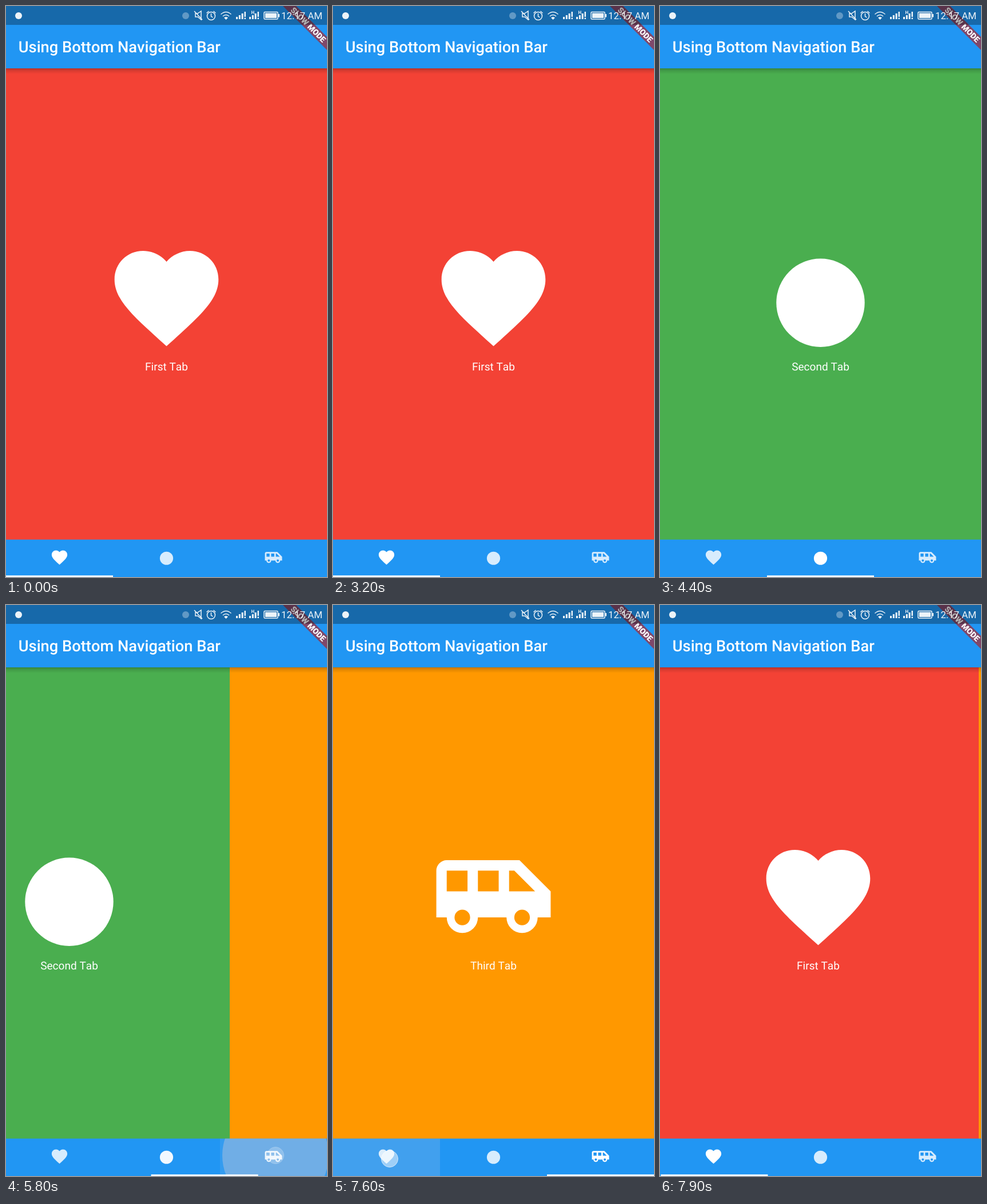
Write an HTML page that moves like this. It is 561x998 px and loops after 8 s.

```html
<!DOCTYPE html>
<html lang="en">
<head>
<meta charset="utf-8">
<title>Using Bottom Navigation Bar</title>
<style>
  html, body { margin: 0; width: 100%; height: 100%; overflow: hidden; background: #2196f3; }
  svg {
    display: block; width: 100%; height: 100%;
    font-family: Roboto, sans-serif; font-kerning: none; text-rendering: geometricPrecision;
  }
  .label { font-size: 19.07px; text-anchor: middle; fill: #fff; }
  .line { fill: none; stroke: #fff; stroke-width: 1.5; }
</style>
</head>
<body>
<svg viewBox="0 0 561 998">
  <defs>
    <path id="icon0" d="M12 21.35l-1.45-1.32C5.4 15.36 2 12.28 2 8.5 2 5.42 4.42 3 7.5 3c1.74 0 3.41.81 4.5 2.09C13.09 3.81 14.76 3 16.5 3 19.58 3 22 5.42 22 8.5c0 3.78-3.4 6.86-8.55 11.54z"/>
    <circle id="icon1" cx="12" cy="13" r="8.5"/>
    <path id="icon2" fill-rule="evenodd" d="M17 5H3a2 2 0 0 0-2 2v9h2a3 3 0 0 0 6 0h5.5a3 3 0 0 0 6 0H23v-5zM3 11V7h4v4zm1.5 5a1.5 1.5 0 0 1 3 0 1.5 1.5 0 0 1-3 0zM9 11V7h4v4zm7 5a1.5 1.5 0 0 1 3 0 1.5 1.5 0 0 1-3 0zM15 11V7h1l4 4z"/>
    <linearGradient id="shade" x2="0" y2="1">
      <stop stop-opacity=".24"/>
      <stop offset=".4" stop-opacity=".11"/>
      <stop offset="1" stop-opacity="0"/>
    </linearGradient>
    <clipPath id="cell"><rect id="cellBox" y="932.6" width="187" height="65.4"/></clipPath>
  </defs>

  <g id="pages"></g>

  <!-- App bar -->
  <rect y="109" width="561" height="10" fill="url(#shade)"/>
  <rect width="561" height="109" fill="#2196f3"/>
  <text x="21.8" y="80.5" font-size="27.25" font-weight="500" fill="#fff">Using Bottom Navigation Bar</text>
  <g transform="translate(561) rotate(45)">
    <rect x="-90" y="38.2" width="180" height="16.3" fill="#b71c1c" fill-opacity=".63"/>
    <text y="51.2" font-size="13.9" font-weight="900" text-anchor="middle" fill="#fff">SLOW MODE</text>
  </g>

  <!-- Status bar -->
  <rect width="561" height="33" fill-opacity=".3"/>
  <g fill="#fff" opacity=".92">
    <circle cx="22" cy="17" r="6"/>
    <circle cx="314" cy="17" r="6" opacity=".35"/>
    <path class="line" d="M331 13h4l6-4v15l-6-5h-4zM329 9l14 15"/>
    <path class="line" d="M351.5 17.5a7 7 0 1 0 14 0 7 7 0 1 0-14 0M358.5 13v5l3 2M350.5 12.5l4-3.5M366.5 12.5l-4-3.5"/>
    <path class="line" stroke-width="2" d="M375.5 14.5q9-8 18 0M379 18q5.5-5 11 0"/>
    <path d="M381 20.5q3.5-3 7 0L384.5 24z"/>
    <g id="signals"></g>
    <text x="428.5" y="14" font-size="8" font-weight="700">H</text>
    <rect class="line" x="451" y="10.5" width="24" height="12.5" rx="1.5"/>
    <path d="M453 12.5h20v8.5h-20zM476 14h2v5.5h-2z"/>
    <text x="481" y="23" font-size="16.9">12:17 AM</text>
  </g>

  <!-- Bottom tabs -->
  <rect y="932.6" width="561" height="65.4" fill="#2196f3"/>
  <g clip-path="url(#cell)" fill="#c8c8d8">
    <rect id="highlight" y="932.6" width="187" height="66"/>
    <circle id="splash"/>
  </g>
  <g id="tabs"></g>
  <rect id="indicator" y="995.3" width="187" height="2.7" fill="#fff"/>
  <circle id="touch" r="14.5" fill="#fff" fill-opacity=".65" stroke="#fff"/>
</svg>

<script>
const W = 561, CELL = W / 3, LOOP = 8000, STEP = 100, SLIDE = 300;
const PAGES = [['First Tab', '#f34235'], ['Second Tab', '#4aae4f'], ['Third Tab', '#ff9800']];
const MOVES = [
  { start: 3930, from: 0, to: 1, touch: [283, 965] },
  { start: 5739, from: 1, to: 2, touch: [471, 962] },
  { start: 7632, from: 2, to: 0, touch: [99, 968] }
];

const $ = id => document.getElementById(id);
const set = (el, attrs) => { for (const key in attrs) el.setAttribute(key, attrs[key]); };
const clamp = v => Math.min(1, Math.max(0, v));

$('pages').innerHTML = PAGES.map(([label, color], i) => `<g>
  <rect y="109" width="${W}" height="824" fill="${color}"/>
  <use href="#icon${i}" transform="translate(171.5 400.7) scale(9.083)" fill="#fff"/>
  <text class="label" x="280.5" y="637">${label}</text></g>`).join('');
$('tabs').innerHTML = PAGES.map((_, i) =>
  `<use href="#icon${i}" transform="translate(${CELL * (i + .5) - 16.35} 947.5) scale(1.3625)" fill="#fff"/>`).join('');
$('signals').innerHTML = [402, 425].map(x =>
  [4, 7, 10].map((h, i) => `<rect x="${x + i * 4.8}" y="${23 - h}" width="3" height="${h}"/>`).join('') +
  `<path d="M${x + 14.5} 10h2.5v9h-2.5zm0 10.5h2.5v2.5h-2.5z"/>`).join('');

const pages = [...$('pages').children], tabs = [...$('tabs').children];

// cubic-bezier(.25, .1, .25, 1), solved by bisection
function ease(x) {
  if (x <= 0 || x >= 1) return clamp(x);
  let lo = 0, hi = 1, s;
  for (let i = 0; i < 24; i++) {
    s = (lo + hi) / 2;
    if (.75 * s * (1 - s) + s ** 3 < x) lo = s; else hi = s;
  }
  return .3 * s * (1 - s) ** 2 + 3 * s * s * (1 - s) + s ** 3;
}

// u is the time since the page began to slide; the press starts earlier
function drawPress(move, u, pressed) {
  const cellX = move.to * CELL, [x, y] = move.touch;
  set($('cellBox'), { x: cellX });
  set($('highlight'), {
    x: cellX,
    opacity: pressed ? .19 * clamp((u + 200) / 170) * clamp((150 - u) / 150) : 0
  });
  set($('splash'), {
    cx: x, cy: y, r: Math.max(0, 93 * (u + 200) / 261),
    opacity: pressed ? .55 * clamp((u + 30) / 90) * clamp((230 - u) / 230) : 0
  });
  set($('touch'), { cx: x, cy: y, opacity: pressed ? .75 * clamp((110 - u) / 110) : 0 });
}

function draw(time) {
  const t = Math.floor(time / STEP) * STEP;
  const move = MOVES.findLast(m => t >= m.start - 140) || MOVES[0];
  const { from, to } = move, u = t - move.start, dir = Math.sign(to - from);
  const p = ease(u / SLIDE), lead = ease((u + 7) / SLIDE);

  pages.forEach((page, i) => {
    const x = i === from ? -dir * p * W : i === to ? dir * (1 - p) * W : W;
    set(page, { transform: `translate(${Math.round(x)})` });
  });
  tabs.forEach((tab, i) => {
    const active = i === from ? 1 - lead : i === to ? lead : 0;
    set(tab, { opacity: .82 + .18 * active });
  });
  set($('indicator'), { x: CELL * (from + (to - from) * lead) });
  drawPress(move, u, u >= -140 && u < 250);
}

function tick() {
  draw(performance.now() % LOOP);
  requestAnimationFrame(tick);
}
tick();
</script>
</body>
</html>
```
